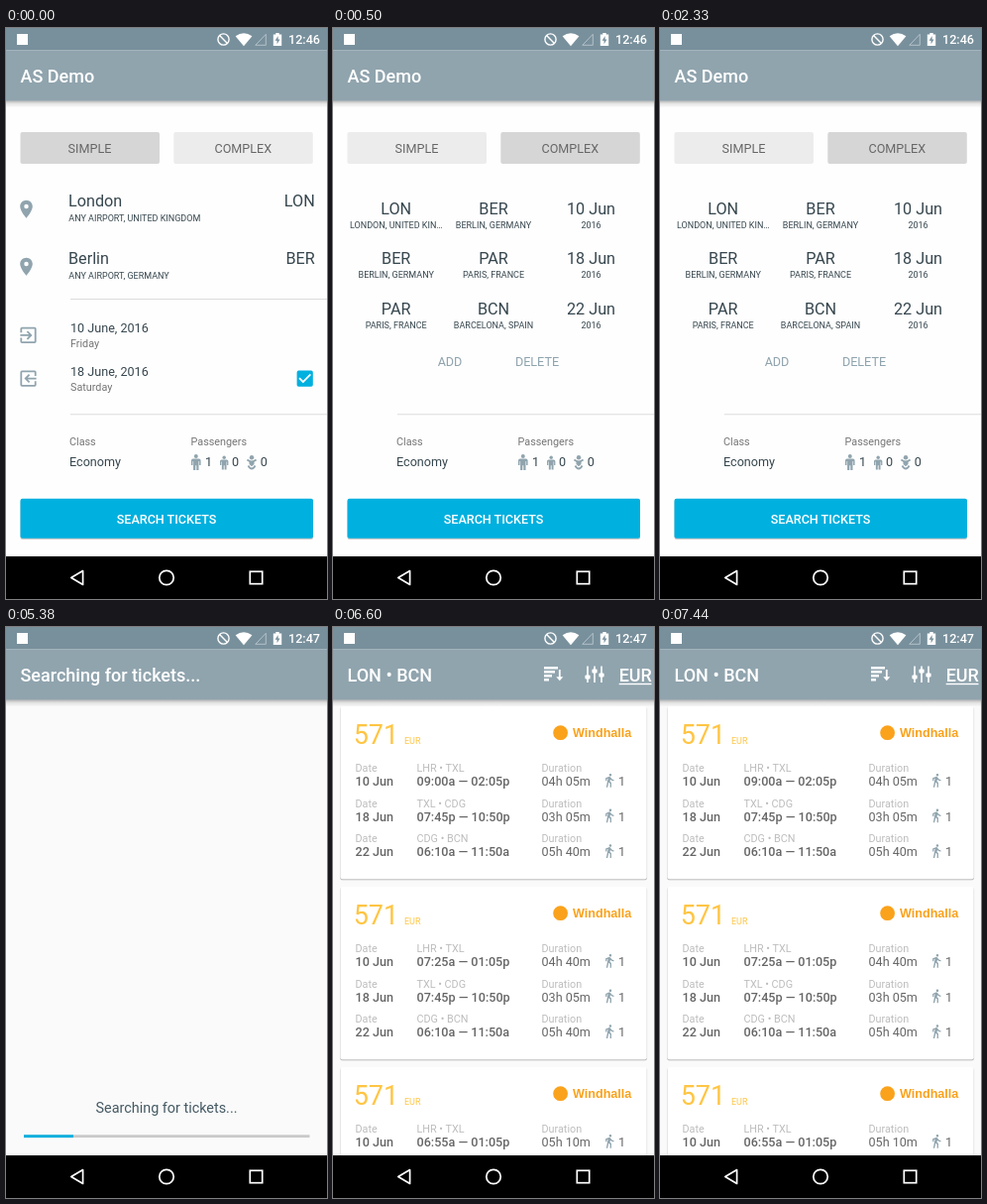
Recreate the animation shown at these times as an HTML page. Size 324 by 576 pixels, loop 8000 ms.

```html
<!DOCTYPE html>
<html lang="en">
<head>
<meta charset="utf-8">
<title>Ticket search</title>
<style>
  html, body { margin: 0; height: 100%; overflow: hidden; background: #fafafa; }
  svg { display: block; width: 100vw; height: 100vh; font-family: Roboto, sans-serif; }
</style>
</head>
<body>
<svg id="stage" viewBox="0 0 324 576"></svg>
<script>
const SLATE = '#90a4ae', INK = '#37474f', GREY = '#757575', BLUE = '#00b0df', GOLD = '#ffc544';
const PIN = 'M12 2C8.1 2 5 5.1 5 9c0 5.3 7 13 7 13s7-7.7 7-13c0-3.9-3.1-7-7-7zm0 9.5a2.5 2.5 0 0 1 0-5 2.5 2.5 0 0 1 0 5z';
const ENTER = 'M10.1 15.6L11.5 17l5-5-5-5-1.4 1.4L12.7 11H3v2h9.7zM19 3H5a2 2 0 0 0-2 2v4h2V5h14v14H5v-4H3v4a2 2 0 0 0 2 2h14a2 2 0 0 0 2-2V5a2 2 0 0 0-2-2z';
const CHECKBOX = 'M19 3H5a2 2 0 0 0-2 2v14a2 2 0 0 0 2 2h14a2 2 0 0 0 2-2V5a2 2 0 0 0-2-2zm-9 14l-5-5 1.4-1.4 3.6 3.6 7.6-7.6L19 8z';
const WALK = 'M13.5 5.5a2 2 0 1 0 0-4 2 2 0 0 0 0 4zM9.8 8.9L7 23h2.1l1.8-8 2.1 2v6h2v-7.5l-2.1-2 .6-3A7.3 7.3 0 0 0 19 13v-2c-1.9 0-3.5-1-4.3-2.4l-1-1.6c-.6-.9-1.6-1.2-2.5-.8L6 8.3V13h2V9.6z';

const text = (x, y, s, size, fill, weight = 400, anchor = 'start', extra = '') =>
  `<text x="${x}" y="${y}" font-size="${size}" fill="${fill}" font-weight="${weight}" text-anchor="${anchor}" ${extra}>${s}</text>`;
const centred = (x, y, s, size, fill, weight) => text(x, y, s, size, fill, weight, 'middle');
const rect = (x, y, w, h, fill, extra = '') =>
  `<rect x="${x}" y="${y}" width="${w}" height="${h}" fill="${fill}" ${extra}/>`;
const path = (d, fill, extra = '') => `<path d="${d}" fill="${fill}" ${extra}/>`;
const line = (d, width, stroke = '#fff') => path(d, 'none', `stroke="${stroke}" stroke-width="${width}"`);
// 24-unit icon centred on x, y
const icon = (d, x, y, fill, sx = .9, sy = .9) =>
  path(d, fill, `transform="translate(${x} ${y}) scale(${sx} ${sy}) translate(-12 -12)"`);
const title = s => text(14.5, 55, s, 18, '#fff', 500);
const clock = s => text(317, 16.3, s, 12.6, '#fff', 500, 'end');

function person(x, top, s) {
  return `<g transform="translate(${x} ${top}) scale(${s})" fill="${SLATE}"><circle cy="2" r="2"/>` +
    path('M-3 4.6H3Q4.8 4.6 4.8 6.4V11H3.3V7H2.7V16H.5V11.3H-.5V16H-2.7V7H-3.3V11H-4.8V6.4Q-4.8 4.6-3 4.6z', SLATE) + '</g>';
}

function chrome() {
  return rect(0, 0, 324, 22.5, '#78909c') + rect(0, 22.5, 324, 51, SLATE) +
    rect(0, 73.5, 324, 7, 'url(#shade)') + rect(11, 6, 11, 11, '#fff') +
    '<circle cx="219.5" cy="11.5" r="5.6" fill="none" stroke="#fff" stroke-width="1.4"/>' +
    line('M215.6 7.6L223.4 15.4', 1.4) +
    path('M231.6 8.3Q240 2 248.4 8.3L240 18.2z', '#fff') +
    line('M251.8 17.3H262.3V6.3z', .8, '#c3ced3') +
    path('M269.8 6.5H272.3V5H275.7V6.5H278.2V18H269.8z', '#fff') +
    path('M274.6 8L271.6 12.8H273.6V16.3L276.5 11.5H274.6z', '#78909c') +
    rect(0, 533, 324, 43, '#000') +
    '<g stroke-linejoin="round">' + line('M65.8 554.5L77.6 547.6V561.4z', 1.7) + '</g>' +
    '<circle cx="162" cy="554.5" r="7.2" fill="none" stroke="#fff" stroke-width="1.7"/>' +
    rect(246.3, 548.3, 12.4, 12.4, 'none', 'stroke="#fff" stroke-width="1.7"');
}

function form(complex) {
  const tab = (x, s, on) => rect(x, 105, 140.5, 32, on ? '#d6d6d6' : '#ececec', 'rx="2"') +
    centred(x + 70, 126, s, 12.6, '#666');
  const rule = y => rect(65, y, 259, 1, '#dcdcdc');
  return rect(0, 73, 324, 460, '#fefefe') + title('AS Demo') + clock('12:46') +
    tab(14.5, 'SIMPLE', !complex) + tab(169.3, 'COMPLEX', complex) +
    (complex ? legs() : rule(273) + trip()) + rule(389.3) +
    text(64, 421, 'Class', 10.8, GREY) + text(64, 442, 'Economy', 12.6, INK) +
    text(186.5, 421, 'Passengers', 10.8, GREY) +
    person(191.8, 430, 1) + person(220.2, 431.5, .87) +
    `<circle cx="248" cy="433.3" r="2.2" fill="${SLATE}"/>` +
    line('M243.4 435.5Q248 439.3 252.6 435.5M244.5 441.5Q246 444.5 248 444.5T251.5 441.5', 1.8, SLATE) +
    path('M245.5 437H250.5V440L248 442.3L245.5 440z', SLATE) +
    [['1', 201], ['0', 228], ['0', 256.7]].map(([n, x]) => text(x, 442, n, 12.6, INK)).join('') +
    rect(14.5, 476, 295.5, 40, '#0003', 'rx="2"') + rect(14.5, 474.7, 295.5, 40, BLUE, 'rx="2"') +
    centred(162, 499.5, 'SEARCH TICKETS', 12.6, '#fff', 500);
}

function trip() {
  const place = (y, city, code, country) => icon(PIN, 20.5, y + 2.7, SLATE) +
    text(63, y, city, 16.2, INK) + text(311.7, y, code, 16.2, INK, 400, 'end') +
    text(63.3, y + 14.7, 'ANY AIRPORT, ' + country, 9, INK);
  const date = (y, day, weekday, flip) => icon(ENTER, 22.5, y + 2.6, SLATE, flip) +
    text(65, y, day + ' June, 2016', 12.6, INK) + text(65, y + 15, weekday, 10.8, GREY);
  return place(180, 'London', 'LON', 'UNITED KINGDOM') + place(238, 'Berlin', 'BER', 'GERMANY') +
    date(307.3, 10, 'Friday', .9) + date(351, 18, 'Saturday', -.9) +
    icon(CHECKBOX, 301.7, 353.7, BLUE);
}

function legs() {
  const rows = [
    ['LON', 'LONDON, UNITED KIN…', 'BER', 'BERLIN, GERMANY', '10 Jun', '2016'],
    ['BER', 'BERLIN, GERMANY', 'PAR', 'PARIS, FRANCE', '18 Jun', '2016'],
    ['PAR', 'PARIS, FRANCE', 'BCN', 'BARCELONA, SPAIN', '22 Jun', '2016']
  ];
  return rows.map((row, r) => row.map((s, i) =>
    centred([63.7, 162, 260.5][i >> 1], 188 + r * 50.3 + i % 2 * 14, s, i % 2 ? 9 : 16.2, INK)).join('')).join('') +
    centred(118, 340.7, 'ADD', 12.6, SLATE) + centred(206, 340.7, 'DELETE', 12.6, SLATE);
}

function searching() {
  return title('Searching for tickets...') + clock('12:47') +
    centred(162, 490, 'Searching for tickets...', 14.4, '#455a64') +
    rect(18, 512.3, 288.5, 2.8, '#c9c9c9') + rect(18, 512.3, 50, 2.8, BLUE);
}

function card(y, firstTime, firstDuration) {
  const flights = [
    ['10 Jun', 'LHR • TXL', firstTime, firstDuration],
    ['18 Jun', 'TXL • CDG', '07:45p — 10:50p', '03h 05m'],
    ['22 Jun', 'CDG • BCN', '06:10a — 11:50a', '05h 40m']
  ];
  const pair = (x, y, label, value, weight) =>
    text(x, y, label, 10.8, '#bdbdbd') + text(x, y + 14, value, 12.6, '#666', weight);
  return `<g transform="translate(0 ${y})">` +
    rect(6.8, .6, 310.6, 175.2, '#0000000d', 'rx="3"') + rect(7.3, 1, 309.6, 174.3, '#0003', 'rx="2"') +
    rect(7.5, 0, 309.2, 174.3, '#fff', 'rx="2"') +
    text(20.7, 38, '571', 27, GOLD) + text(72, 38, 'EUR', 9, GOLD) +
    '<circle cx="229.6" cy="26.7" r="7.4" fill="#faa21b"/>' +
    text(242, 31.2, 'Windhalla', 12.6, '#faa21b', 700, 'start', 'font-family="Liberation Sans, sans-serif"') +
    flights.map(([day, route, time, duration], i) => {
      const top = 66 + i * 35.6;
      return pair(22.5, top, 'Date', day, 500) + pair(84.5, top, route, time, 500) +
        pair(210.5, top, 'Duration', duration, 400) + icon(WALK, 279, top + 8.7, SLATE, .64, .64) +
        text(288, top + 14, '1', 12.6, '#666');
    }).join('') + '</g>';
}

function results() {
  const sliders = [[257, 50.5], [264, 44.5], [271, 48.5]].map(([x, y]) =>
    rect(x - .8, 39.5, 1.6, 16.5, '#fff') + rect(x - 2.6, y - 2, 5.2, 4, '#fff', 'rx="1"')).join('');
  const bars = [14, 11, 8, 5].map((w, i) => rect(213, 40 + i * 4, w, 2.5, '#fff')).join('');
  return title('LON • BCN') + clock('12:47') + bars + line('M228.8 43V52', 1.8) +
    path('M225.3 50.2H232.3L228.8 54.2z', '#fff') + sliders +
    text(288.7, 55, 'EUR', 18, '#fff', 500) + rect(288.7, 56.8, 32.8, 1.4, '#fff') +
    '<g clip-path="url(#list)">' + card(80, '09:00a — 02:05p', '04h 05m') +
    card(262, '07:25a — 01:05p', '04h 40m') + card(444, '06:55a — 01:05p', '05h 10m') + '</g>';
}

const stage = document.getElementById('stage');
const scenes = [form(false), form(true), searching(), results()];
// The form paints its own background, so each scene is split around the shared bars.
stage.innerHTML =
  `<defs><linearGradient id="shade" x2="0" y2="1"><stop stop-opacity=".28"/><stop offset=".4" stop-opacity=".1"/>
  <stop offset="1" stop-opacity="0"/></linearGradient>
  <clipPath id="list"><rect y="73" width="324" height="460"/></clipPath></defs>
  <rect width="324" height="576" fill="#fafafa"/>` +
  scenes.map(s => `<g class="scene">${s.startsWith('<rect') ? s.slice(0, s.indexOf('/>') + 2) : ''}${chrome()}${
    s.startsWith('<rect') ? s.slice(s.indexOf('/>') + 2) : s}</g>`).join('');

const groups = stage.querySelectorAll('.scene');
const starts = [0, 500, 3550, 6600];
function draw() {
  const t = performance.now() % 8000;
  const current = starts.filter(s => s <= t).length - 1;
  groups.forEach((g, i) => g.style.display = i === current ? '' : 'none');
  requestAnimationFrame(draw);
}
draw();
</script>
</body>
</html>
```
